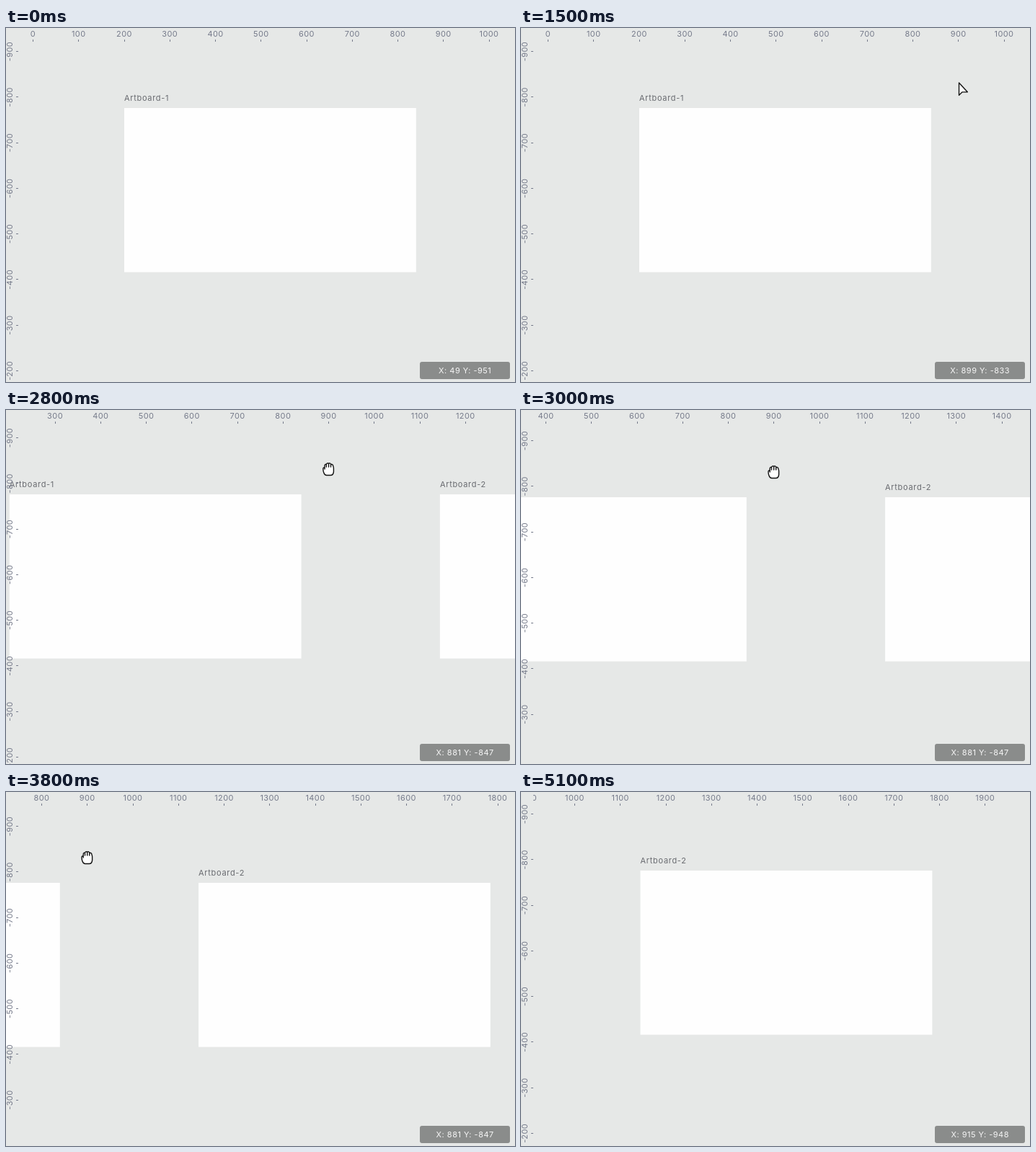
Animation, 706 px wide and 491 px high, one loop 5500 ms. Source, as an HTML page:

```html
<!DOCTYPE html>
<html lang="en">
<head>
<meta charset="utf-8">
<title>Panning the canvas</title>
<style>
  html, body { margin: 0; width: 100%; height: 100%; overflow: hidden; background: #e6e8e7; }
  svg { display: block; font: 11px Inter, "DejaVu Sans", sans-serif; letter-spacing: .4px; }
  .board { fill: #fefefe; }
  .name { fill: #696b70; letter-spacing: .68px; }
  .ruler { fill: #767b8b; text-anchor: middle; }
  .ruler rect { shape-rendering: crispEdges; }
  .cursor { fill: #fff; stroke: #111; stroke-width: 1.4; stroke-linejoin: round; stroke-linecap: round; }
  #status { fill: #f6f6f6; text-anchor: middle; letter-spacing: .5px; }
</style>
</head>
<body>
<svg width="706" height="491" viewBox="0 0 706 491">
  <defs>
    <clipPath id="clipX"><path d="M17 0H706V20H17Z"/></clipPath>
    <clipPath id="clipY"><path d="M0 18H20V491H0Z"/></clipPath>
  </defs>
  <g id="boards"></g>
  <g class="ruler" id="rulerX" clip-path="url(#clipX)"></g>
  <g class="ruler" id="rulerY" clip-path="url(#clipY)"></g>
  <rect x="574" y="463" width="125" height="24" rx="3" fill="#8a8c8b"/>
  <text id="status" x="636.7" y="479"></text>
  <path id="arrow" class="cursor" d="M0 0V17.3L4.6 12.8H11.8Z"/>
  <path id="hand" class="cursor" d="M-7.2 0Q-7.4-2.6-5-2.2V-5Q-4.6-7.2-2.7-6.8Q-1.5-9 .5-8Q2.6-9 3.5-6.8Q6.4-7.2 6.8-4Q7.4-3 7.4-1V3.5Q7 8.4 3 8.4H-2.5Q-5 8.4-6 5.5Q-7.2 3-7.2 0ZM-5-2.2V0M-2.7-6.6V-3M.5-7.8V-3M3.5-6.6V-3"/>
</svg>
<script>
const SCALE = 0.6325, LOOP = 5500, STEP = 100;

const linear = u => u;
const easeIn = u => u ** 1.5;
const easeOut = u => 1 - (1 - u) ** 1.5;
const smooth = u => u * u * (3 - 2 * u);

const glide = (from, to, dx, dy, ease = linear) => ({ from, to, dx, dy, ease });

// screen position of the world origin, moved by each drag
const pan = {
  x: 37.5, y: 601.8,
  moves: [
    glide(1800, 1900, -1, 0),
    glide(2400, 2500, -13, 0),
    glide(2500, 3000, -242, 10),
    glide(3000, 3800, -238, 5, easeOut),
    glide(3800, 4300, -97.5, -13, easeIn),
    glide(4700, 4800, -4, -4)
  ]
};
// pointer in world units
const pointer = {
  x: 49, y: -951,
  moves: [
    glide(300, 600, 18, 102, easeIn),
    glide(800, 1500, 832, 16, smooth),
    glide(1500, 1700, -18, -14),
    glide(4200, 4300, 2, 0),
    glide(4800, 5100, 32, -101, easeIn)
  ]
};

function locate({ x, y, moves }, t) {
  for (const { from, to, dx, dy, ease } of moves) {
    const k = ease(Math.min(1, Math.max(0, (t - from) / (to - from))));
    x += dx * k;
    y += dy * k;
  }
  return { x, y };
}

const $ = id => document.getElementById(id);
const place = (node, x, y) => node.setAttribute('transform', `translate(${x} ${y})`);
const show = (node, on) => node.setAttribute('visibility', on ? 'visible' : 'hidden');

function add(parent, tag, attrs, text = '') {
  const node = document.createElementNS('http://www.w3.org/2000/svg', tag);
  for (const key in attrs) node.setAttribute(key, attrs[key]);
  node.textContent = text;
  return parent.appendChild(node);
}

const boards = [200, 1144].map((x, i) => {
  const node = add($('boards'), 'g', {});
  add(node, 'rect', { class: 'board', width: 640 * SCALE, height: 360 * SCALE });
  add(node, 'text', { class: 'name', y: -10 }, `Artboard-${i + 1}`);
  return { node, x };
});

function makeRuler(parent, from, to, tick, label) {
  const marks = [];
  for (let value = from; value <= to; value += 100) {
    const node = add(parent, 'g', {});
    add(node, 'rect', tick);
    add(node, 'text', label, value);
    marks.push({ node, value });
  }
  return marks;
}
const marksX = makeRuler($('rulerX'), 0, 2000,
  { x: -.5, y: 16, width: 1, height: 3 }, { y: 12 });
const marksY = makeRuler($('rulerY'), -1000, -100,
  { x: 14, y: -.5, width: 3, height: 1 }, { transform: 'translate(9 0) rotate(-90)' });

function render(t) {
  const origin = locate(pan, t), point = locate(pointer, t);
  for (const { node, x } of boards) place(node, origin.x + x * SCALE, origin.y - 776 * SCALE);
  for (const { node, value } of marksX) {
    const x = origin.x + value * SCALE;
    place(node, x, 0);
    show(node, x > 0 && x < 696);
  }
  for (const { node, value } of marksY) {
    const y = origin.y + value * SCALE;
    place(node, 0, y);
    show(node, y > 0 && y < 482);
  }

  const x = origin.x + point.x * SCALE, y = origin.y + point.y * SCALE;
  const grabbing = t >= 1700 && t < 4900;
  place($('arrow'), x + 1.4, y + 1.1);
  place($('hand'), x + 11.5, y + 10);
  show($('arrow'), !grabbing && t >= 400 && t < 5100);
  show($('hand'), grabbing);
  $('status').textContent = `X: ${Math.round(point.x)} Y: ${Math.round(point.y)}`;
}

const start = performance.now();
function tick() {
  const t = (performance.now() - start) % LOOP;
  render(Math.floor(t / STEP) * STEP);
  requestAnimationFrame(tick);
}
tick();
</script>
</body>
</html>
```
